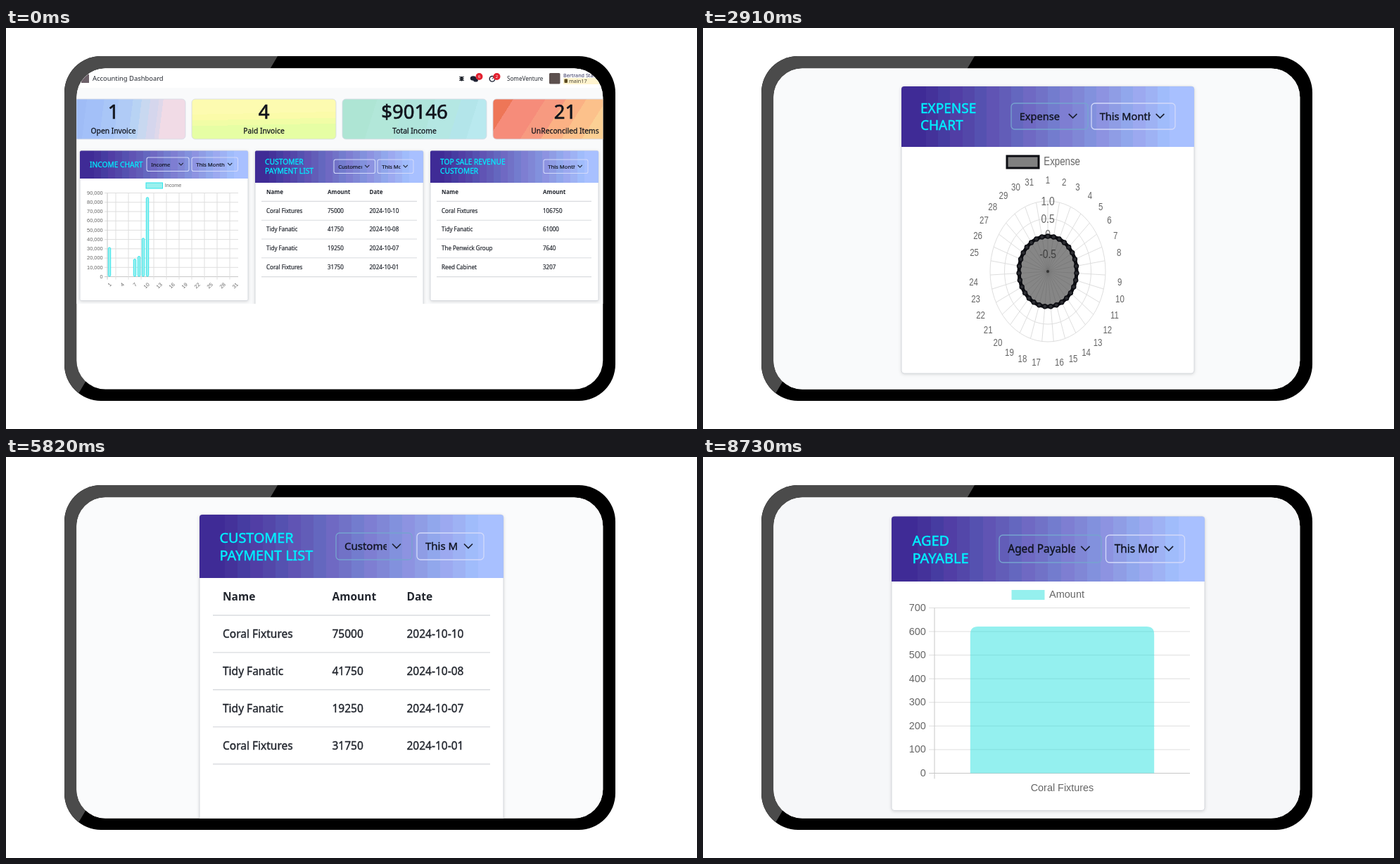
Write an HTML page that moves like this. It is 982 px wide and 570 px high and loops after 9700 ms.

```html
<!DOCTYPE html>
<html lang="en">
<head>
<meta charset="utf-8">
<title>Accounting dashboard</title>
<style>
html, body { margin: 0; width: 100%; height: 100%; overflow: hidden; background: #fff; }
svg { display: block; }
text { font-family: "Noto Sans", "Open Sans", sans-serif; white-space: pre; }
.plot text { font-family: "Liberation Sans", Arial, sans-serif; fill: #666; }
.medium { stroke: currentColor; stroke-width: .025em; }
.card { fill: #fff; stroke: #d6d9de; filter: drop-shadow(0 1px 2px #0002); }
.scene { visibility: hidden; animation: show 9.7s step-end infinite; }
@keyframes show { 0% { visibility: visible; } 10% { visibility: hidden; } }
</style>
</head>
<body>
<script>
const INK = '#22262e', CYAN = '#00f0ff', TEAL = 'rgba(43,226,223,.5)', RED = '#f03c0c';
const AXIS = '#c8c8c8', GRID = '#dedede', DARK = '#0c0d12';
const range = (n, f) => Array.from({ length: n }, (_, i) => f(i));
const all = (n, f) => range(n, f).join('');

const rect = (x, y, w, h, fill, more = '') =>
  `<rect x="${x}" y="${y}" width="${w}" height="${h}" fill="${fill}" ${more}/>`;
const line = (x1, y1, x2, y2, color, w = 1) =>
  `<path d="M${x1} ${y1}L${x2} ${y2}" stroke="${color}" stroke-width="${w}"/>`;
const circle = (x, y, r, fill, more = '') => `<circle cx="${x}" cy="${y}" r="${r}" fill="${fill}" ${more}/>`;
const cut = (h, s) => `<svg width="982" height="${h}">${s}</svg>`;

// Text centred vertically on y; medium weight is regular with a hairline outline.
const text = (x, y, s, size, { weight = 400, fill = INK, anchor = 'start' } = {}) =>
  `<text x="${x}" y="${y + size * .36}" font-size="${size}" font-weight="${weight === 500 ? 400 : weight}" ` +
  `${weight === 500 ? 'class="medium"' : ''} fill="${fill}" color="${fill}" text-anchor="${anchor}">${s}</text>`;

// Chart label; k is the horizontal scale of the whole chart.
const label = (x, y, s, size, k = 1, anchor = 'start', turn = 0) =>
  `<text transform="translate(${x} ${y}) scale(${k} 1) rotate(${turn})" y="${size * .36}" font-size="${size}" text-anchor="${anchor}">${s}</text>`;

const title = (x, ys, lines, size, weight = 500) =>
  lines.map((s, i) => text(x, ys[i], s, size, { weight, fill: CYAN })).join('');

function bands(id, stops, angle = 0) {
  const body = stops.map(([at, color], i) => {
    const end = i + 1 < stops.length ? stops[i + 1][0] : 1;
    return `<stop offset="${at}" stop-color="${color}"/><stop offset="${end}" stop-color="${color}"/>`;
  }).join('');
  return `<linearGradient id="${id}" gradientTransform="rotate(${angle} .5 .5)">${body}</linearGradient>`;
}

function headerBands() {
  const n = 24, from = [63, 43, 150], to = [168, 192, 255];
  const tints = [[-3, 3, 1], [3, -2, 0], [0, 0, -1]];
  return bands('head', range(n, i => {
    const t = Math.min(1, Math.max(0, (i - 1) / (n - 3)));
    const tint = t && t < 1 ? tints[i % 3] : [0, 0, 0];
    return [i / n, `rgb(${from.map((c, j) => Math.round(c + (to[j] - c) * t + tint[j]))})`];
  }));
}

function card(x, y, w, h, head, r = 4) {
  return rect(x, y, w, h, '#fff', `class="card" rx="${r}"`) +
    `<path fill="url(#head)" d="M${x} ${y + head}v${r - head}q0 ${-r} ${r} ${-r}h${w - 2 * r}q${r} 0 ${r} ${r}v${head - r}z"/>`;
}

function select(x, y, w, h, s, focused) {
  const u = h / 38, cx = x + w - 22 * u, cy = y + h / 2;
  return rect(x, y, w, h, 'none', `rx="${5 * u}" stroke="${focused ? '#76a4cf' : '#d3dafa'}" stroke-width="${.7 + .6 * u}"`) +
    `<svg x="${x}" y="${y}" width="${w - 36 * u}" height="${h}">${text(12 * u, h / 2, s, 15 * u, { weight: 500, fill: '#111522' })}</svg>` +
    `<path d="M${cx - 6 * u} ${cy - 3.5 * u}l${6 * u} ${6 * u}l${6 * u} ${-6 * u}" fill="none" stroke="#1b2030" stroke-width="${.5 + 1.2 * u}"/>`;
}

function table(x0, x1, cols, y, step, rows, size, head = true) {
  return rows.map((row, i) =>
    row.map((s, j) => text(cols[j], y + step * i, s, size, { weight: head && !i ? 600 : 500 })).join('') +
    line(x0, y + step * (i + .5), x1, y + step * (i + .5), '#d9dbdf', size > 10 ? 1.4 : 1.1)).join('');
}

function grid({ x0, x1, y0, y1, max, step, fs, k = 1, xs }) {
  const n = max / step, tick = fs * .55;
  return all(n + 1, i => {
    const y = y1 - (y1 - y0) * i / n;
    return line(x0 - tick, y, x1, y, i ? GRID : AXIS) +
      label(x0 - fs * .85, y - fs * .05, (i * step).toLocaleString('en-US'), fs, k, 'end');
  }) + xs.map((x, i) => line(x, y0, x, y1 + tick, i ? GRID : AXIS)).join('');
}

const daily = { 1: 31750, 7: 19250, 8: 22300, 9: 41750, 10: 85600 };
const busy = Object.entries(daily);

// Geometry of a month axis: slots for bars, or points edge to edge.
function month(o, slots = true) {
  const dx = (o.x1 - o.x0) / (slots ? 31 : 30);
  const at = d => o.x0 + dx * (d - (slots ? .5 : 1));
  const y = v => o.y1 - (o.y1 - o.y0) * v / 90000;
  const xs = range(11, i => slots ? o.x0 + dx * Math.max(0, 3 * i - 1) : at(3 * i + 1));
  const frame = grid({ ...o, max: 90000, step: 10000, xs }) +
    all(11, i => label(at(3 * i + 1) + o.fs * .2, o.y1 + o.fs * 1.3, 3 * i + 1, o.fs, o.k, 'end', -45));
  return { dx, at, y, frame };
}

function incomeBars(o) {
  const m = month(o), sw = o.fs / 8.2, w = m.dx * .72 - sw;
  return m.frame + busy.map(([d, v]) =>
    rect(m.at(d) - w / 2, m.y(v) + sw / 2, w, o.y1 - m.y(v) - sw, '#9af0ee', `rx="${w / 2}" stroke="#2be4ea" stroke-width="${sw}"`)).join('');
}

function profitLine(m) {
  const pts = range(31, i => [m.at(i + 1), m.y(daily[i + 1] || 0)]);
  const path = 'M' + pts.map(p => p.join(' ')).join('L');
  return `<path d="${path}V${m.y(0)}H${m.at(1)}z" fill="rgba(0,0,0,.1)"/>` +
    `<path d="${path}" fill="none" stroke="${RED}" stroke-width="3" stroke-linejoin="round"/>` +
    pts.map(([x, y]) => `<ellipse cx="${x}" cy="${y}" rx="3.7" ry="4.1" fill="rgba(0,0,0,.1)" stroke="${RED}" stroke-width="1.2"/>`).join('');
}

function radar(cx, cy, r, k, fs) {
  const n = 31, spoke = (i, q) => {
    const a = 2 * Math.PI * i / n;
    return [cx + Math.sin(a) * q * k, cy - Math.cos(a) * q];
  };
  const ring = (q, fill, stroke, w) =>
    `<ellipse cx="${cx}" cy="${cy}" rx="${q * k}" ry="${q}" fill="${fill}" stroke="${stroke}" stroke-width="${w}"/>`;
  const scale = (q, s) => label(cx, cy - r * q, s, fs * 1.2, k, 'middle');
  return all(4, i => ring(r * (i + 1) / 4, 'none', GRID, 1)) +
    all(n, i => line(cx, cy, ...spoke(i, r), GRID)) +
    all(n, i => {
      const [x, y] = spoke(i, r * 1.21);
      return label(x, y + (y < cy ? -.62 : .62) * fs, i + 1, fs, k, i ? (x > cx ? 'start' : 'end') : 'middle');
    }) +
    scale(.53, '0') + ring(r / 2, '#868686', DARK, 5) +
    all(n, i => line(cx, cy, ...spoke(i, r / 2), 'rgba(90,90,90,.3)', .8)) +
    all(n, i => circle(...spoke(i, r / 2), 3, '#2c2d32', `stroke="${DARK}" stroke-width="1.4"`)) +
    circle(cx, cy, 2, '#333') +
    scale(1, '1.0') + scale(.75, '0.5') + `<g style="filter:brightness(.6)">${scale(.25, '-0.5')}</g>`;
}

const swatch = (x, y, w, h, fill, stroke, sw, s, fs, k) =>
  rect(x, y, w, h, fill, stroke ? `stroke="${stroke}" stroke-width="${sw}"` : '') +
  label(x + w + fs * .45, y + h / 2 - fs * .08, s, fs, k);

function amountBars({ x0, x1, y1, y0, max, fs, r, items, ...rest }) {
  const slot = (x1 - x0) / items.length, w = slot * .72;
  return grid({ x0, x1, y0, y1, max, fs, ...rest, xs: items.map((_, i) => x0 + slot * i) }) +
    items.map(([name, v], i) => {
      const mid = x0 + slot * (i + .5), h = (y1 - y0) * v / max;
      return `<path fill="${TEAL}" d="M${mid - w / 2} ${y1}v${r - h}q0 ${-r} ${r} ${-r}h${w - 2 * r}q${r} 0 ${r} ${r}v${h - r}z"/>` +
        label(mid, y1 + fs * 1.4, name, fs, 1, 'middle');
    }).join('');
}

const plot = s => `<g class="plot" fill="none">${s}</g>`;
const backdrop = color => rect(100, 57, 749, 457, color);

const CORAL = 'Coral Fixtures', TIDY = 'Tidy Fanatic', PENWICK = 'The Penwick Group', REED = 'Reed Cabinet';
const receivable = [[PENWICK, 7640], [REED, 3207]];
const head3 = ['Name', 'Amount', 'Date'];
const customerRows = [head3, [CORAL, '75000', '2024-10-10'], [TIDY, '41750', '2024-10-08'],
  [TIDY, '19250', '2024-10-07'], [CORAL, '31750', '2024-10-01']];
const vendorRows = [head3, [REED, '1400', '2024-10-08'], ['Handy Rug', '6000', '2024-10-10'],
  [TIDY, '12000', '2024-10-09'], [CORAL, '4000', '2024-10-10']];

function navBar() {
  const badge = (x, s) => circle(x, 69, 5, '#e3202f') + text(x, 69, s, 6, { fill: '#fff', anchor: 'middle' });
  const bug = `<ellipse cx="647.5" cy="72.3" rx="2.2" ry="3.2" fill="${INK}"/>` +
    [69.5, 72, 74.5].map(y => line(644, y, 651, y, INK, .9)).join('');
  const chat = '<ellipse cx="664" cy="71.5" rx="4.2" ry="3.3" fill="#1f2233"/><ellipse cx="667.5" cy="74" rx="3.4" ry="2.6" fill="#1f2233"/>';
  const clock = circle(691, 72.3, 3.8, 'none', 'stroke="#1f2233" stroke-width="1.4"') + line(691, 72.5, 693, 70, '#1f2233');
  return rect(100, 57, 749, 28, '#fff') + rect(107, 66, 11, 12, '#6c6068') +
    text(123, 72, 'Accounting Dashboard', 9.4) + bug + chat + badge(672.5, 6) + clock + badge(697.5, 2) +
    text(712, 72, 'SomeVenture', 8.1) + rect(772, 64, 15.5, 15.5, '#5c504e', 'rx="1.5"') +
    rect(792, 71, 57, 9, '#fff4cf') + text(792, 67, 'Bertrand Staff', 7.2, { fill: '#2f2f5c' }) +
    rect(793.5, 72.5, 4.5, 5.5, '#5b4a22', 'rx="1"') + text(800, 75.3, 'main17', 7.3, { fill: '#4a4535' });
}

const stats = [[50, 'blue', '1', 'Open Invoice'], [264, 'lime', '4', 'Paid Invoice'],
  [478, 'mint', '$90146', 'Total Income'], [692, 'coral', '21', 'UnReconciled Items']];
const stat = ([x, id, value, name]) => rect(x, 101, 205, 57, `url(#${id})`, 'rx="5" stroke="#d5dae4" stroke-width=".8"') +
  text(x + 102.5, 119, value, 27.5, { weight: 500, anchor: 'middle', fill: '#12151d' }) +
  text(x + 102.5, 146.5, name, 10.3, { weight: 500, anchor: 'middle', fill: '#12151d' });

const overview = () => cut(392, backdrop('#f9fafb') + navBar() + stats.map(stat).join('') +
  card(105, 174.5, 239, 213, 39.5, 2) + title(119, [194], ['INCOME CHART'], 10.2) +
  select(200, 184, 60, 19.5, 'Income') + select(264, 184, 65.5, 19.5, 'This Month') +
  plot(swatch(199, 220, 23.5, 8, '#9af0ee', '#2be4ea', 1, 'Income', 7.2, 1) +
    incomeBars({ x0: 144, x1: 330, y0: 234.5, y1: 353.5, fs: 7.4, k: 1 })) +
  card(354, 174.5, 239, 240, 45.5, 2) + title(368, [190, 203], ['CUSTOMER', 'PAYMENT LIST'], 10.3) +
  select(466, 187, 58.5, 19.5, 'Customer') + select(528, 187, 51, 19.5, 'This Month') +
  table(363, 584, [370, 457, 516.5], 233, 26.8, customerRows, 8) +
  card(603, 174.5, 239, 213, 45.5, 2) + title(617, [190, 203], ['TOP SALE REVENUE', 'CUSTOMER'], 10.2) +
  select(764, 187, 63, 19.5, 'This Month') +
  table(612, 832, [619, 763], 233, 26.8,
    [['Name', 'Amount'], [CORAL, '106750'], [TIDY, '61000'], [PENWICK, '7640'], [REED, '3207']], 8));

const balances = () => cut(285.5, rect(100, 69, 749, 217, '#f7f7f9') +
  card(104, 69, 241, 240, 27, 1) + title(118, [79], ['BANK AND CASH BALANCE'], 10.5) +
  table(113, 335, [120.5, 215.5], 109.3, 27, [['Name', 'Amount'], ['Bank', '12444.87']], 8) +
  card(355, 69, 241, 215.5, 39, 1) + title(369, [79, 91.5], ['AGED', 'RECEIVABLE'], 10.4) +
  select(447, 75, 74, 19.5, 'Aged Receivable') + select(524, 75, 57.5, 19.5, 'This Month') +
  plot(swatch(449, 114, 23, 7, '#95f0ee', '', 0, 'Amount', 7.2, 1) +
    amountBars({ x0: 390, x1: 585.5, y0: 127, y1: 259, max: 8000, step: 1000, fs: 7.3, r: 6, items: receivable })) +
  card(605.5, 69, 241.5, 240, 34, 1) + title(620, [83], ['TOP CUSTOMERS/VENDORS'], 8.2, 400) +
  select(766, 73, 66.5, 19.5, 'This Month') + text(615, 110.5, 'Customers', 11.5, { weight: 600 }) +
  table(615, 837, [622], 136, 27, [[REED], [PENWICK], [CORAL], [TIDY]], 8.1, false) +
  text(615, 247.5, 'Vendors', 11.5, { weight: 600 }) + text(622, 273, CORAL, 8.1, { weight: 500 }));

const income = () => rect(265, 60, 450, 450, '#f9fafb') + cut(501, card(276, 84, 430, 440, 89)) +
  title(304, [116, 140.5], ['INCOME', 'CHART'], 19.5) +
  select(442, 109, 109, 38, 'Income') + select(558, 109, 120, 38, 'This Month') +
  plot(swatch(441, 186, 46, 18, '#9af0ee', '#2be4ea', 2.2, 'Income', 16.4, .84) +
    incomeBars({ x0: 353, x1: 677, y0: 217, y1: 442.5, fs: 16.4, k: .84 }));

const expense = () => backdrop('#f9fafb') + card(282, 83, 416, 408, 86) +
  title(309, [114, 138], ['EXPENSE', 'CHART'], 19) +
  select(438, 107, 109, 37, 'Expense', true) + select(552, 107, 119, 37, 'This Month') +
  plot(swatch(432, 182, 45, 17, '#808080', DARK, 3, 'Expense', 16.2, .82) + radar(490, 346, 100, .82, 14));

function profit() {
  const o = { x0: 356.5, x1: 664.5, y0: 211.5, y1: 430, fs: 16.2, k: .82 }, m = month(o, false);
  return backdrop('#f8f9fb') + cut(493, card(282.5, 83, 415, 430, 86)) +
    title(309.5, [114, 138], ['PROFIT', 'CHART'], 19) +
    select(438, 107, 109, 37, 'Profit', true) + select(552, 107, 119, 37, 'This Month') +
    plot(swatch(432, 182, 45, 17, '#e6e6e6', RED, 3.2, 'Profit/Loss', 16.2, .82) + m.frame + profitLine(m));
}

function allInOne() {
  const o = { x0: 355, x1: 668, y0: 199, y1: 417.5, fs: 16.2, k: .82 }, m = month(o);
  const bars = busy.map(([d, v]) => rect(m.at(d) - 3.7, m.y(v), 7.4, o.y1 - m.y(v), '#95f0ee')).join('');
  return backdrop('#f8f9fb') + card(281, 82, 416, 406, 75) + title(308, [120], ['ALL IN ONE'], 19) +
    select(423.5, 101, 114, 37, 'All In One', true) + select(544.5, 101, 125, 37, 'This Month') +
    plot(swatch(321, 170, 45, 17, '#95f0ee', '', 0, 'Income', 16.2, .82) +
      swatch(426.5, 169, 45, 17.5, '#808080', DARK, 3.2, 'Expense', 16.2, .82) +
      swatch(540.5, 169, 45, 17.5, '#e6e6e6', RED, 3.2, 'Profit/Loss', 16.2, .82) +
      m.frame + bars + profitLine(m) + radar(511, 308, 76, .82, 13.2));
}

const payments = (bg, who, rows) => backdrop(bg) + card(275, 82, 432, 450, 90) +
  title(303.5, [115, 139.5], [who.toUpperCase(), 'PAYMENT LIST'], 19.8) +
  select(469, 108, 108, 38, who + ' List', true) + select(584, 108, 95, 38, 'This Month') +
  table(294, 688, [308, 463.5, 569.5], 198.5, 52.9, rows, 15.5);

const agedReceivable = () => backdrop('#f6f7f9') + card(273, 84, 434, 417, 92) +
  title(302, [118, 143], ['AGED', 'RECEIVABLE'], 19.6) +
  select(441, 110, 134, 38, 'Aged Receivable', true) + select(581, 110, 104, 38, 'This Month') +
  plot(swatch(442, 189, 46, 14, '#95f0ee', '', 0, 'Amount', 14.2, 1) +
    amountBars({ x0: 337, x1: 687, y0: 214, y1: 449, max: 8000, step: 1000, fs: 14, r: 11, items: receivable }));

const agedPayable = () => backdrop('#f6f7f9') + card(268, 84.5, 445, 418, 92.5) +
  title(297.5, [119, 144], ['AGED', 'PAYABLE'], 20) +
  select(421, 111, 145, 39, 'Aged Payable', true) + select(572.5, 111, 112, 39, 'This Month') +
  plot(swatch(438.5, 189, 47, 14, '#95f0ee', '', 0, 'Amount', 14.5, 1) +
    amountBars({ x0: 329, x1: 692, y0: 214.5, y1: 449.5, max: 700, step: 100, fs: 14.4, r: 11, items: [[CORAL, 621]] }));

const scenes = [overview(), balances(), income(), expense(), profit(), allInOne(),
  payments('#fafbfc', 'Customer', customerRows), payments('#f6f7f9', 'Vendor', vendorRows),
  agedReceivable(), agedPayable()];

const defs = headerBands() +
  bands('blue', [[0, '#9fbcf6'], [.3, '#a3c0f8'], [.42, '#a9c6f7'], [.52, '#b0cbf6'], [.62, '#b8d3f4'],
    [.68, '#c8d8f0'], [.74, '#d5d6ed'], [.8, '#dfd8ea'], [.83, '#f1dbe6']], 2) +
  bands('lime', [[0, '#fdfbb0'], [.35, '#fbfba9'], [.5, '#f1fda6'], [.64, '#e6fea4']], 86) +
  bands('mint', [[0, '#aee5d4'], [.2, '#b2e7d9'], [.4, '#b0e5dc'], [.6, '#b4e7e3'], [.78, '#b3e5ea'], [.9, '#b9e9ef']], 5) +
  bands('coral', [[0, '#ee7657'], [.06, '#f68c7a'], [.28, '#f79a80'], [.42, '#fbb184'], [.56, '#fcc18b'], [.7, '#fbd094']], 10) +
  '<clipPath id="screen"><rect x="100.3" y="57.4" width="748" height="456.1" rx="41"/></clipPath>' +
  '<clipPath id="shine"><path d="M80 30H392L386 40L104 518L90 540H80z"/></clipPath>';

const shell = (fill, more = '') => rect(83, 40, 783, 490, fill, `rx="52" ${more}`);
document.body.innerHTML = `<svg width="982" height="570" viewBox="0 0 982 570"><defs>${defs}</defs>` +
  shell('#000') + shell('#4b4b4b', 'clip-path="url(#shine)"') +
  `<g clip-path="url(#screen)">${backdrop('#fff')}` +
  scenes.map((s, i) => `<g class="scene" style="animation-delay:${(.97 * (i - 10)).toFixed(2)}s">${s}</g>`).join('') +
  '</g></svg>';
</script>
</body>
</html>
```
